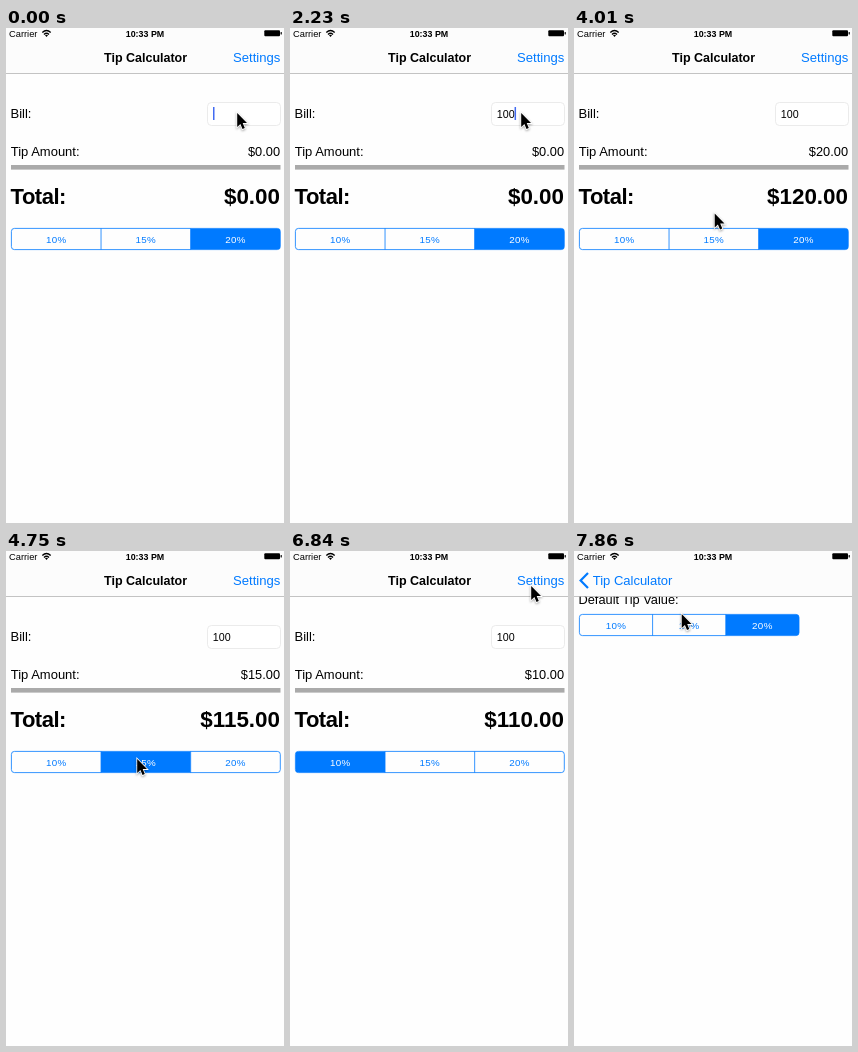
An HTML page for the animation above (8000 ms loop, 278 px wide and 495 px high).

```html
<!DOCTYPE html>
<html lang="en">
<head>
<meta charset="utf-8">
<title>Tip calculator</title>
<style>
  html, body { margin: 0; width: 100%; height: 100%; overflow: hidden; background: #fff; }
  svg { display: block; width: 100vw; height: 100vh; font-family: "Liberation Sans", Arial, sans-serif; }
  text { white-space: pre; }
  .label { font-size: 13px; }
  .seg { font-size: 9.8px; letter-spacing: .35px; text-anchor: middle; }
  .big { font-size: 22.4px; font-weight: bold; }
  .end { text-anchor: end; }
  .blue { fill: #007aff; }
  #cursor { filter: drop-shadow(0 1px 1px rgba(0, 0, 0, .35)); }
</style>
</head>
<body>
<svg viewBox="0 0 278 495" preserveAspectRatio="none">
  <rect width="278" height="495" fill="#fefefe"/>

  <g id="main">
    <text class="label" x="4.5" y="89.7">Bill:</text>
    <rect x="201.5" y="74.5" width="73" height="23" rx="4" fill="#fff" stroke="#e6e6e6" stroke-width=".8"/>
    <text id="bill" x="206.8" y="89.8" font-size="10.7"></text>
    <rect id="caret" y="79" width="1.5" height="13" fill="#426bf2"/>
    <text class="label" x="4.7" y="127.8">Tip Amount:</text>
    <text class="end" id="tip" x="274" y="127.8" font-size="12.8"></text>
    <rect x="5" y="137" width="269.5" height="4.6" fill="#aaa"/>
    <text class="big" x="4.6" y="175.8" style="font-size:22px;letter-spacing:-.5px">Total:</text>
    <text class="big end" id="total" x="274" y="175.8"></text>
    <g id="rates"></g>
  </g>
  <rect id="dim" width="278" height="495"/>

  <g id="settings">
    <rect width="278" height="495" fill="#fefefe"/>
    <text x="4.5" y="53.2" font-size="12.8">Default Tip Value:</text>
    <g id="defaults"></g>
  </g>

  <rect width="278" height="45" fill="#fcfcfc"/>
  <rect y="45" width="278" height=".8" fill="#b4b4b4"/>
  <text id="title" y="33.8" font-size="12.5" font-weight="bold">Tip Calculator</text>
  <text class="blue" id="back" y="33.8" font-size="13">Tip Calculator</text>
  <path id="chevron" d="M14 22 L6.6 29.5 L14 37" fill="none" stroke="#007aff" stroke-width="2.2"/>
  <text class="blue end" id="link" x="274.3" y="33.8" font-size="13.1">Settings</text>

  <text x="3" y="8.7" font-size="9.3">Carrier</text>
  <g fill="none" stroke="#000" stroke-width="1.4">
    <path d="M36.3 4.4 Q40.5 .6 44.7 4.4"/>
    <path d="M38 6.4 Q40.5 4.1 43 6.4"/>
  </g>
  <path d="M39 7.3 Q40.5 6.2 42 7.3 L40.5 9 Z"/>
  <text x="139" y="8.7" font-size="8.9" font-weight="bold" text-anchor="middle">10:33 PM</text>
  <rect x="258.3" y="2.2" width="15.7" height="6" rx="1"/>
  <rect x="274.6" y="4" width="1.2" height="2.5" rx=".5"/>

  <path id="cursor" d="M0 0 V14 L3.2 11 L5.3 16.1 L7.6 15.1 L5.5 10.1 H9.8 Z"
        stroke="#fff" stroke-width="1.6" paint-order="stroke"/>
</svg>
<script>
const LOOP = 8000, TICK = 148.3;
const BLUE = "#007aff", PALE = "#e6f1ff";
const RATES = [10, 15, 20];
const el = id => document.getElementById(id);
const clamp = v => Math.max(0, Math.min(1, v));
const mix = (a, b, p) => a + (b - a) * p;
const money = v => "$" + v.toFixed(2);
const fade = (id, v) => el(id).setAttribute("opacity", clamp(v));
const move = (id, x, y) => el(id).setAttribute("transform", `translate(${x} ${y})`);

// Segmented control; returns a function that paints its state.
function segments(id, y, width) {
  const w = width / 3, x = 5.4, h = 21.2;
  const box = `x="${x}" y="${y}" width="${width}" height="${h}" rx="3"`;
  let s = `<clipPath id="${id}Clip"><rect ${box}/></clipPath><g clip-path="url(#${id}Clip)">`;
  RATES.forEach((r, i) => s += `<rect x="${x + i * w}" y="${y}" width="${w}" height="${h}"/>`);
  s += `</g><g fill="none" stroke="${BLUE}" stroke-width=".8"><rect ${box}/>`;
  for (const i of [1, 2]) s += `<path d="M${x + i * w} ${y} v${h}"/>`;
  s += "</g>";
  RATES.forEach((r, i) => s += `<text class="seg" x="${x + (i + .5) * w}" y="${y + 14.1}">${r}%</text>`);
  const group = el(id);
  group.innerHTML = s;
  const cells = group.querySelectorAll(":scope > g:first-of-type rect");
  const names = group.querySelectorAll("text");
  return (on, pale) => RATES.forEach((r, i) => {
    cells[i].setAttribute("fill", i === on ? BLUE : i === pale ? PALE : "#fefefe");
    names[i].setAttribute("fill", i === on ? "#fff" : BLUE);
  });
}
const paintRates = segments("rates", 200.4, 268.9);
segments("defaults", 63.4, 219.6)(2, -1);

// Stepped value: the last entry whose tick has been reached.
const at = (steps, n) => steps.filter(s => s[0] <= n).pop()[1];

const typed = [[0, ""], [8, "1"], [13, "10"], [14, "100"]];
const blink = [[0, 1], [4, .4], [5, 0], [7, .5], [8, 1], [11, .4], [12, 0],
               [13, 1], [14, .7], [15, 1], [19, .4], [20, 0]];
const chosen = [[0, 2], [31, 1], [37, 0]];
const pressed = [[0, -1], [30, 1], [31, 2], [32, -1], [36, 0], [37, 1], [38, -1]];

// Pointer path: tick, x, y
const path = [[19, 230, 84], [22, 180, 83], [24, 180, 83], [27, 139.5, 184.5],
              [29, 130, 207], [33, 130, 207], [36, 67.5, 206], [39, 67.5, 206],
              [46, 240, 34], [50, 240, 34], [53, 106.5, 62]];

function pointer(n) {
  if (n <= path[0][0]) return path[0].slice(1);
  const i = path.findIndex(k => k[0] >= n);
  const a = path[i - 1], b = path[i];
  let p = (n - a[0]) / (b[0] - a[0]);
  if (b[0] - a[0] > 5) p = p * p * (3 - 2 * p);
  return [mix(a[1], b[1], p), mix(a[2], b[2], p)];
}

function draw(t) {
  const n = Math.min(53, Math.floor(t / TICK));

  const bill = at(typed, n), rate = at(chosen, n);
  el("bill").textContent = bill;
  el("caret").setAttribute("x", 207 + bill.length * 5.85);
  fade("caret", at(blink, n));
  const tip = n >= 22 ? bill * RATES[rate] / 100 : 0;
  el("tip").textContent = money(tip);
  el("total").textContent = money(n >= 22 ? +bill + tip : 0);
  paintRates(rate, at(pressed, n));

  // push to the settings screen
  const p = n < 48 ? 0 : n > 50 ? 1 : 1 - Math.exp(-1.43 * (n - 47.5));
  move("main", -83.4 * p, 0);
  move("settings", 278 * (1 - p), 0);
  fade("dim", .11 * p);
  el("title").setAttribute("x", mix(98, 18.7, p));
  el("back").setAttribute("x", mix(111, 18.7, p));
  fade("title", 1 - 1.6 * p);
  fade("back", p * 1.15);
  fade("chevron", (p - .86) / .14);
  fade("link", n < 47 ? 1 : n === 47 ? .3 : (1 - p) * .8);

  const [cx, cy] = pointer(n);
  move("cursor", cx + 1.2, cy + 1);
}

const start = performance.now();
function frame() {
  draw((performance.now() - start) % LOOP);
  requestAnimationFrame(frame);
}
frame();
</script>
</body>
</html>
```
